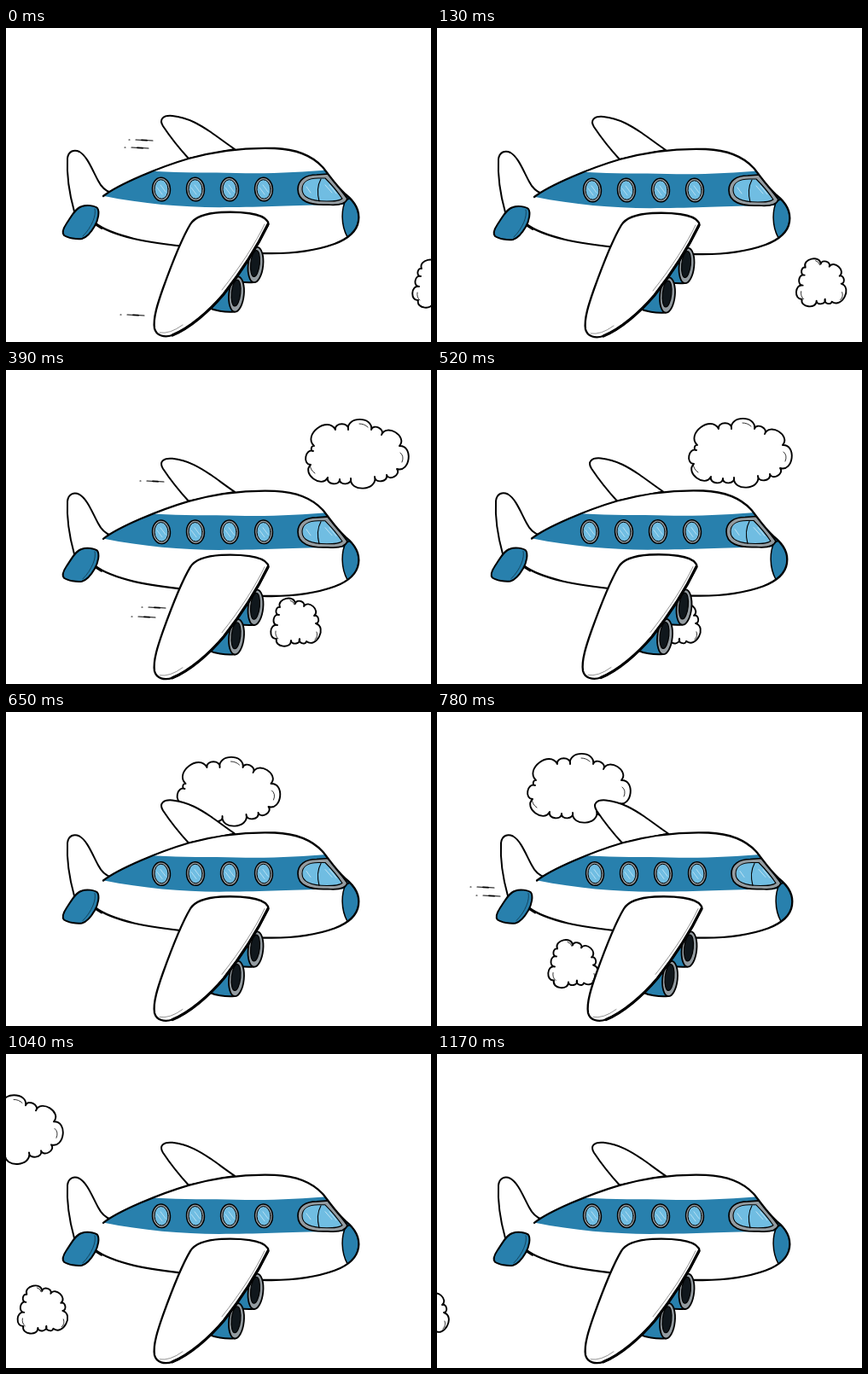
An HTML page with a canvas for the animation above (1300 ms loop, 498 by 368 pixels).

```html
<!DOCTYPE html>
<html lang="en">
<head>
<meta charset="utf-8">
<title>Flying plane</title>
<style>
html, body { margin: 0; width: 100%; height: 100%; overflow: hidden; background: #fff; }
canvas { display: block; }
</style>
</head>
<body>
<canvas id="sky" width="498" height="368"></canvas>
<script>
const ctx = document.getElementById('sky').getContext('2d');
const BLUE = '#2880ad', GLASS = '#70bde2', GREY = '#949ca1', INK = '#000';
const STEP = 130, STEPS = 10;

// Motion keys: step, x, y
const planeKeys = [[0, 0, 0], [1, 0, 1], [2, 0, 5.5], [3, 0, .8], [4, -3, .5], [6, 3, .5], [7, 0, .8]];
const puffKeys = [[0, 478, 270], [3, 312, 266], [6, 132, 265.5], [9, -43, 272]];
const cloudKeys = [[3, 352, 59], [4, 296, 58], [6, 107, 50], [9, -133, 49]];

// Start points of the speed streaks, by step
const streaks = {
  0: [[152, 131], [147, 140], [142, 336]],
  2: [[38, 192], [39, 203], [152, 321]],
  3: [[165, 130], [167, 278], [155, 289]],
  6: [[47, 205], [54, 215]]
};

function follow(keys, s) {
  const i = keys.findIndex(k => k[0] >= s);
  if (i <= 0) return (i ? keys[keys.length - 1] : keys[0]).slice(1);
  const [s0, x0, y0] = keys[i - 1], [s1, x1, y1] = keys[i];
  const t = (s - s0) / (s1 - s0);
  return [x0 + (x1 - x0) * t, y0 + (y1 - y0) * t];
}

// Joins clockwise points with round outward bumps
function bumps(points, bulge = .45) {
  const p = new Path2D();
  let [x, y] = points[points.length - 1];
  p.moveTo(x, y);
  for (const [ex, ey] of points) {
    const dx = ex - x, dy = ey - y;
    const vx = dy * bulge * 4 / 3, vy = -dx * bulge * 4 / 3;
    p.bezierCurveTo(x + vx - dx * .1, y + vy - dy * .1, ex + vx + dx * .1, ey + vy + dy * .1, ex, ey);
    x = ex; y = ey;
  }
  p.closePath();
  return p;
}

const cloud = bumps([
  [9, 30], [34, 11], [49, 11], [76, 11], [88, 17], [109, 30], [106, 57],
  [94, 64], [80, 66], [52, 68], [39, 69], [25, 67], [5, 52], [8, 36]
]);
const cloudMarks = new Path2D('M62 4Q68 4 72 8M110 38Q115 42 112 49M4 52Q5 59 10 62');
const puff = bumps([
  [9, 12], [27, 8], [37, 11], [49, 22], [51, 31], [40, 52],
  [32, 49], [22, 51], [5, 49], [6, 33], [8, 21]
]);
const puffMarks = new Path2D('M21 4Q25 5 26 9M52 41Q54 46 50 50M4 40Q3 46 7 49');

const farWing = new Path2D('M214 153C203 141 192 127 184 115C179 107 184 102 195 103C214 105 228 114 240 122C250 129 259 136 268 142Z');
const fin = new Path2D('M80 215C75 197 71 172 72 153C73 144 80 142 86 145C95 150 101 166 108 179C112 187 117 191 123 193L112 235Z');
const hull = new Path2D('M114 197C132 183 180 163 214 153C250 143 285 140 315 141C340 142 359 150 371 163C380 174 386 184 398 195C408 203 415 213 413 226C411 240 398 248 385 253C360 262 330 265 300 264C250 261 180 254 150 247C130 242 114 236 105 229');
const hullFill = new Path2D(hull);
hullFill.lineTo(88, 212);
hullFill.closePath();
const band = new Path2D('M115 197L150 165L176 168C205 170 240 169 270 170C310 171 345 169 380 166L408 207C340 207 310 210 265 210C215 211 165 207 115 197Z');
const nose = new Path2D('M398 202C393 212 392 230 400 245L420 245L420 210L404 199Z');
const stabilizer = new Path2D('M89 209C94 207 104 208 107 211C110 215 108 225 104 232C100 239 96 245 89 247C83 248 72 246 68 243C65 240 67 235 71 229C76 222 81 211 89 209Z');
const cockpit = new Path2D('M342 189C342 178 351 172 364 172L378 171L400 200C398 207 389 208 377 207C356 208 342 203 342 189Z');
const windshield = new Path2D('M347 189C347 180 355 176 366 176L374 176C381 183 388 191 394 200C390 203 384 203 376 203C357 203 347 199 347 189Z');
const wing = new Path2D('M306 226C300 217 275 215 252 216C236 217 222 220 216 230C204 250 193 280 184 305C178 322 172 340 174 352C176 361 186 363 195 360C215 352 238 332 255 312C277 284 295 255 307 231Q308 228 306 226Z');
const wingEdge = new Path2D('M307 230C295 255 277 284 255 312C238 332 215 352 195 360');

function draw(path, fill, width = 2, color = INK) {
  if (fill) { ctx.fillStyle = fill; ctx.fill(path); }
  if (width) { ctx.strokeStyle = color; ctx.lineWidth = width; ctx.stroke(path); }
}

function line(d, width, color) {
  draw(new Path2D(d), null, width, color);
}

function oval(x, y, rx, ry, fill, width, tilt) {
  const p = new Path2D();
  p.ellipse(x, y, rx, ry, tilt, 0, 7);
  draw(p, fill, width);
}

function porthole(x, y) {
  oval(x, y, 10.5, 13.8, GREY, 1.4, -.06);
  oval(x, y, 8, 11.3, GLASS, 1, -.06);
  line(`M${x - 5} ${y - 2}L${x + 1} ${y + 6}M${x - 1} ${y - 5}L${x + 5} ${y + 3}`, .8, '#c4e6f5');
}

function engine(x, y) {
  draw(new Path2D(`M${x - 4} ${y - 16}L${x - 32} ${y + 16}C${x - 26} ${y + 19} ${x - 14} ${y + 21.5} ${x - 2} ${y + 20.5}Z`), BLUE);
  oval(x, y, 8.8, 20.8, GREY, 1.8, .1);
  oval(x - .5, y - 1.5, 5.3, 15.5, '#10171c', 1.2, .1);
}

function plane() {
  draw(farWing, '#fff');
  draw(fin, '#fff');

  draw(hullFill, '#fff', 0);
  ctx.save();
  ctx.clip(hullFill);
  draw(band, BLUE, 0);
  draw(nose, BLUE, 1.5);
  draw(cockpit, GREY, 1.7);
  draw(windshield, GLASS, 1.1);
  ctx.restore();
  line('M369 177Q363 188 367 203', 1.1);
  line('M352 186L357 193M374 184L382 193M379 184L387 194', .9, '#c4e6f5');
  draw(hull, null, 2.3);

  for (let i = 0; i < 4; i++) porthole(182 + i * 40, 189);
  draw(stabilizer, BLUE);
  line('M104 212C106 219 101 233 90 244', .9, '#123f57');

  engine(292.5, 277.5);
  engine(270, 312);
  draw(wing, '#fff', 2.3);
  draw(wingEdge, null, 3.2);
  line('M303 230C293 251 276 278 253 307M180 357Q192 359 207 348', .7, '#666');
}

function at([x, y], paint) {
  ctx.save();
  ctx.translate(x, y);
  paint();
  ctx.restore();
}

function drift(shape, marks) {
  draw(shape, '#fff', 1.9);
  draw(marks, null, .8);
}

function streak([x, y]) {
  line(`M${x - 8} ${y}h1M${x} ${y}l20 1`, 1.1);
  line(`M${x + 7} ${y + .4}l6 .3`, 1.8);
}

function render(s) {
  ctx.fillStyle = '#fff';
  ctx.fillRect(0, 0, 498, 368);
  ctx.lineJoin = ctx.lineCap = 'round';

  if (s >= cloudKeys[0][0]) at(follow(cloudKeys, s), () => drift(cloud, cloudMarks));
  at(follow(puffKeys, s), () => drift(puff, puffMarks));
  (streaks[s] || []).forEach(streak);
  at(follow(planeKeys, s), plane);
}

const start = performance.now();
function tick() {
  render(Math.floor((performance.now() - start) / STEP) % STEPS);
  requestAnimationFrame(tick);
}
tick();
</script>
</body>
</html>
```
